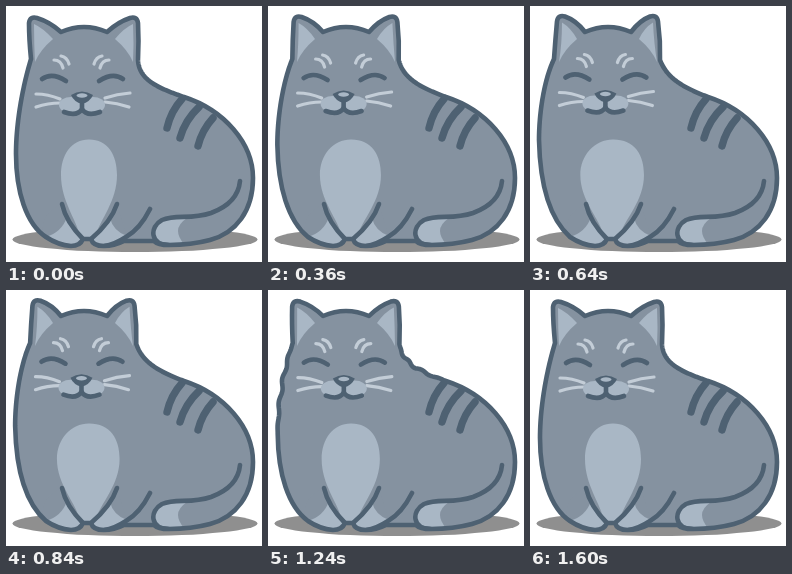
Write an HTML page with a canvas that moves like this. It is 256 by 256 pixels and loops after 1.68 s.

```html
<!DOCTYPE html>
<html lang="en">
<head>
<meta charset="utf-8">
<title>Purring cat</title>
<style>
  html, body { margin: 0; width: 100%; height: 100%; overflow: hidden; background: #fff; }
  canvas { display: block; width: 100vmin; height: 100vmin; }
</style>
</head>
<body>
<canvas id="stage" width="256" height="256"></canvas>
<script>
const canvas = document.getElementById('stage');
const ctx = canvas.getContext('2d');
const FUR = '#8592a0', LINE = '#4e6172', LIGHT = '#a9b7c5', PALE = '#c3cdd7', SHADOW = '#8f8f8f';
const LOOP = 1680, STEP = 40, INHALE = 600, EXHALE = 1000;
const SHIVER_START = 1160, SHIVER = 400;

function paint(path, fill, stroke, width = 4.6) {
  if (fill) { ctx.fillStyle = fill; ctx.fill(path); }
  if (stroke) {
    ctx.strokeStyle = stroke;
    ctx.lineWidth = width;
    ctx.stroke(path);
  }
}
const fill = (d, color) => paint(new Path2D(d), color);
const line = (d, color = LINE, width = 4.6) => paint(new Path2D(d), null, color, width);

function ellipse(x, y, rx, ry, color) {
  const path = new Path2D();
  path.ellipse(x, y, rx, ry, 0, 0, Math.PI * 2);
  paint(path, color);
}

// Cubic curve whose middle can stand up in small tufts.
function ruffledCurve(path, a, b, c, d, waves, amp) {
  const steps = 60;
  for (let i = 1; i <= steps; i++) {
    const u = i / steps, v = 1 - u;
    const at = k => v * v * v * a[k] + 3 * v * v * u * b[k] + 3 * v * u * u * c[k] + u * u * u * d[k];
    const slope = k => v * v * (b[k] - a[k]) + 2 * v * u * (c[k] - b[k]) + u * u * (d[k] - c[k]);
    const dx = slope(0), dy = slope(1), len = Math.hypot(dx, dy) || 1;
    const lift = amp * Math.sin(Math.PI * u) * Math.sin(2 * Math.PI * waves * u);
    path.lineTo(at(0) + dy / len * lift, at(1) - dx / len * lift);
  }
}

// Breathing in draws the ears together and fills out the neck and flank.
function bodyPath(b, ruffle) {
  const path = new Path2D();
  const inward = 4 * b, up = 1.5 * b;
  const earL = 25 - b, earR = 132 - 2 * b;
  path.moveTo(earL, 53);
  path.quadraticCurveTo(23 + inward * 0.6, 33, 23 + inward, 17 - up);
  path.quadraticCurveTo(24 + inward, 10 - up, 31 + inward, 12 - up);
  path.quadraticCurveTo(44 + inward * 0.6, 16 - up, 55, 26);
  path.quadraticCurveTo(78, 16, 101, 26);
  path.quadraticCurveTo(112 - inward * 0.6, 16 - up, 124 - inward, 12 - up);
  path.quadraticCurveTo(131 - inward, 10 - up, 132 - inward, 17 - up);
  path.quadraticCurveTo(133 - inward * 0.6, 35, earR, 54);
  ruffledCurve(path, [earR, 54], [133 + 4 * b, 74 - 2 * b], [152, 82 - b], [178, 91], 3.5, ruffle);
  path.bezierCurveTo(218, 104, 247, 137, 247, 172);
  path.bezierCurveTo(247, 205, 230, 227, 204, 234);
  path.quadraticCurveTo(185, 239, 163, 239);
  path.quadraticCurveTo(152, 239, 148, 235);
  path.lineTo(118, 235);
  path.quadraticCurveTo(108, 240, 98, 240);
  path.quadraticCurveTo(87, 240, 85, 233);
  path.lineTo(77, 233);
  path.quadraticCurveTo(74, 240, 65, 240);
  path.quadraticCurveTo(52, 239, 40, 231);
  path.bezierCurveTo(20, 218 - 5 * b, 10, 185 - 6 * b, 10 - b, 148 - 14 * b);
  ruffledCurve(path, [10 - b, 148 - 14 * b], [10 - b, 113 - 6 * b], [18 - 4 * b, 76 - 2 * b], [earL, 53], 4, ruffle);
  path.closePath();
  return path;
}

function drawEars(b) {
  const tip = 4 * b, y = 18 - 1.5 * b;
  fill(`M${28 + tip} ${y} Q${28 + tip} 38 29 56 Q34 44 47 33 Q${37 + tip} 22 ${28 + tip} ${y}Z`, LIGHT);
  fill(`M${127 - tip} ${y} Q${128 - tip} 38 127 56 Q122 44 109 33 Q${118 - tip} 22 ${127 - tip} ${y}Z`, LIGHT);
}

function drawFace() {
  line('M48 54 Q55 54 57 62 M55 50 Q61 51 63 58', PALE, 3.2);
  line('M103 54 Q96 54 94 62 M96 50 Q90 51 88 58', PALE, 3.2);
  line('M36 73 Q46 66 60 75 M117 73 Q107 66 93 75');

  line('M30 88 Q42 88 54 93 M30 101 Q42 97 54 97', PALE, 3.2);
  line('M124 87 Q111 88 99 92 M123 101 Q111 97 99 96', PALE, 3.2);

  ellipse(65, 99, 12, 8, LIGHT);
  ellipse(87, 99, 12, 8, LIGHT);
  line('M58 106 Q71 111 76 103 Q81 111 94 106');
  line('M76 95 V102');
  fill('M65 89 Q76 82 87 89 Q84 96 76 98 Q68 96 65 89Z', LINE);
  ellipse(76, 89.5, 5.5, 2.2, LIGHT);
}

function drawBelly(b) {
  const left = 55 - 4.7 * b, right = 111 + 3 * b, top = 133.5;
  fill(`M83 ${top} C${right - 9} ${top} ${right} 149 ${right} 169
        C${right} 195 95 212 88 233 L75 233
        C70 212 ${left} 195 ${left} 169 C${left} 149 65 ${top} 83 ${top}Z`, LIGHT);
}

function drawLegs() {
  fill('M56 198 Q60 215 77 233 L50 238 L36 226 Q36 205 56 198Z', FUR);
  fill('M111 198 Q105 215 85 233 L98 239 L122 233Z', FUR);
  fill('M40 231 Q56 226 61 211 Q66 223 77 233 Q74 240 65 240 Q52 239 40 231Z', LIGHT);
  fill('M85 233 Q99 221 104 212 Q107 225 121 230 Q108 240 98 240 Q87 240 85 233Z', LIGHT);
  line('M56 198 Q60 216 77 233');
  line('M111 198 Q105 216 85 233');
  line('M144 203 Q134 223 120 231 Q108 239 98 240');
}

function drawTail() {
  fill('M163 239 C145 239 144 221 157 214 Q166 210 181 212 Q172 218 172 225 Q172 231 178 238Z', LIGHT);
  line('M163 239 C144 239 143 221 156 214 C170 208 184 214 205 207 Q232 197 234 175');
}

function drawStripes() {
  line('M176 93 Q165 105 161 122 M193 101 Q179 114 174 132 M207 112 Q196 124 192 140', LINE, 7.4);
}

function draw(now) {
  const t = Math.min(Math.floor((now % LOOP) / STEP) * STEP, INHALE + EXHALE);
  const phase = t < INHALE ? t / INHALE : 1 + (t - INHALE) / EXHALE;
  const breath = (1 - Math.cos(Math.PI * phase)) / 2;
  const shiver = (t - SHIVER_START) / SHIVER;
  const ruffle = shiver > 0 && shiver < 1 ? 2 * Math.sin(Math.PI * shiver) : 0;

  ctx.fillStyle = '#fff';
  ctx.fillRect(0, 0, 256, 256);
  ctx.lineCap = ctx.lineJoin = 'round';
  ellipse(129, 233.5, 122.5, 12.5, SHADOW);

  const body = bodyPath(breath, ruffle);
  paint(body, FUR);
  ctx.save();
  ctx.clip(body);
  drawBelly(breath);
  drawLegs();
  drawStripes();
  drawTail();
  drawEars(breath);
  ctx.restore();
  paint(body, null, LINE);

  ctx.save();
  ctx.translate(-0.6 * breath, -1.5 * breath);
  drawFace();
  ctx.restore();
}

const start = performance.now();
function tick() {
  draw(performance.now() - start);
  requestAnimationFrame(tick);
}
tick();
</script>
</body>
</html>
```
